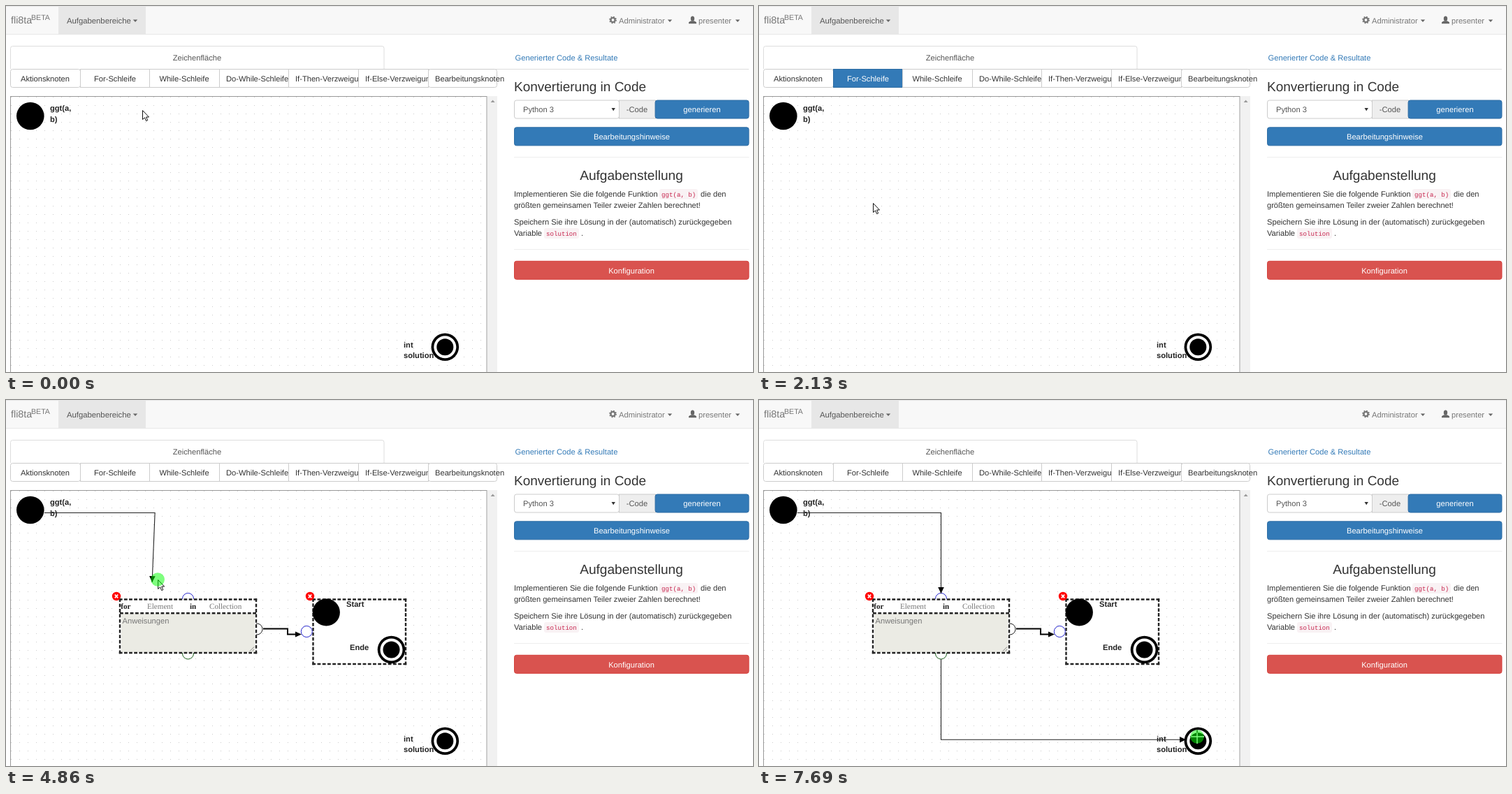
These frames come from a looping animation (1069 by 524 pixels, 8 s). An HTML page:

```html
<!DOCTYPE html>
<html lang="de">
<head>
<meta charset="utf-8">
<title>Aktivitätsdiagramm</title>
<style>
html, body { margin: 0; width: 100%; height: 100%; overflow: hidden; background: #fff; }
svg { display: block; isolation: isolate; }
text { font: 11.15px "Liberation Sans", Arial, sans-serif; fill: #333; text-rendering: geometricPrecision; white-space: pre; }
.mid { text-anchor: middle; }
.bold { font-weight: bold; fill: #222; }
.head { font-size: 19.1px; }
.nav { fill: #777; }
.white { fill: #fff; }
.link { fill: #337ab7; }
.code { font: 9.15px "Liberation Mono", monospace; fill: #c7254e; }
.serif { font: 11.1px "Liberation Serif", Times, serif; fill: #777; }
.serif.bold { font-weight: bold; fill: #222; }
.wire { fill: none; stroke: #222; stroke-width: 1.1; }
</style>
</head>
<body>
<svg id="stage" width="1069" height="524" viewBox="0 0 1069 524"></svg>
<script>
const LOOP = 8000;
const stage = document.getElementById('stage');

// Markup helpers
const text = (x, y, s, cls = '', extra = '') => `<text x="${x}" y="${y}" class="${cls}" ${extra}>${s}</text>`;
const box = (x, y, r, b, fill, stroke = 'none', rx = 0) => {
  const o = stroke === 'none' ? 0 : 0.5;
  return `<rect x="${x + o}" y="${y + o}" width="${r - x - 2 * o}" height="${b - y - 2 * o}" rx="${rx}" fill="${fill}" stroke="${stroke}"/>`;
};
const disc = (x, y, r, fill, stroke = 'none', w = 1) =>
  `<circle cx="${x}" cy="${y}" r="${r}" fill="${fill}" stroke="${stroke}" stroke-width="${w}"/>`;
const path = (d, fill = 'none', stroke = 'none', w = 1) => `<path d="${d}" fill="${fill}" stroke="${stroke}" stroke-width="${w}"/>`;
const caret = (x, y) => path(`M${x - 3.2} ${y}h6.4l-3.2 3.4z`, '#666');
const finalNode = (x, y) => disc(x, y, 19.8, '#000') + disc(x, y, 16, '#fff') + disc(x, y, 12, '#000');
const closer = (x, y) => disc(x, y, 6.2, '#f00') + path(`M${x - 2.2} ${y - 2.3}l4.4 4.6m0-4.6l-4.4 4.6`, 'none', '#fff', 1.7);
const group = (id, content, extra = '') => `<g id="${id}" ${extra}>${content}</g>`;

// A dashed side begins and ends with a full dash; the gaps stretch to fit.
function dashed(x1, y1, x2, y2) {
  const dash = 4.8, length = Math.hypot(x2 - x1, y2 - y1);
  const gaps = Math.round((length - dash) / (dash * 1.5));
  const gap = (length - dash) / gaps - dash;
  return `<path d="M${x1} ${y1}L${x2} ${y2}" stroke="#222" stroke-width="2.4" stroke-dasharray="${dash} ${gap}"/>`;
}

function dashedBox(x, y, r, b) {
  const o = 1.2;
  return dashed(x, y + o, r, y + o) + dashed(x, b - o, r, b - o)
    + dashed(x + o, y, x + o, b) + dashed(r - o, y, r - o, b);
}

function navBar() {
  return box(0, 0, 1069, 40, '#f8f8f8') + path('M0 .5H1069M0 40.5H1069', 'none', '#e7e7e7')
    + box(75, 0, 200, 40, '#e7e7e7')
    + text(7, 25, 'fli8ta', 'nav', 'style="font-size:14.3px"')
    + text(36, 20, 'BETA', 'nav', 'style="font-size:10.6px"')
    + text(87, 24.5, 'Aufgabenbereiche', '', 'style="fill:#555;font-size:11.3px"') + caret(185, 19.5)
    + disc(868.5, 20, 3.1, 'none', '#777', 2.4)
    + '<circle cx="868.5" cy="20" r="4.6" fill="none" stroke="#777" stroke-width="1.6" stroke-dasharray="1.8 1.81"/>'
    + text(877, 24.5, 'Administrator', 'nav') + caret(950, 19.5)
    + '<ellipse cx="982.5" cy="18" rx="2.7" ry="3.5" fill="#666"/>'
    + path('M977 25.2v-1.8q.3-1 3.5-2.2h4q3.2 1.2 3.5 2.2v1.8z', '#666')
    + text(991, 24.5, 'presenter', 'nav') + caret(1047, 19.5);
}

const toolLabels = ['Aktionsknoten', 'For-Schleife', 'While-Schleife', 'Do-While-Schleife',
  'If-Then-Verzweigung', 'If-Else-Verzweigung', 'Bearbeitungsknoten'];

function toolBar() {
  return toolLabels.map((label, i) => {
    const x = Math.round(6 + i * 99.6), r = Math.round(6 + (i + 1) * 99.6) + (i < 6 ? 1 : 0);
    const id = i === 1 ? 'id="forButton"' : '';
    return `<g ${id}>` + box(x, 90, r, 117, '#fff', '#ccc', i % 6 ? 0 : 3)
      + (i < 3 ? text(x + 50, 107.5, label, 'mid') : text(x + 10, 107.5, label)) + '</g>';
  }).join('');
}

function sidePanel() {
  return text(802, 77.5, 'Generierter Code &amp; Resultate', 'mid link')
    + text(727, 122.4, 'Konvertierung in Code', 'head', 'style="font-size:19px"')
    + box(727, 134.5, 878, 161.5, '#fff', '#ccc', 3) + text(740, 152, 'Python 3', '', 'style="fill:#555"')
    + path('M866.5 146h5.4l-2.7 4.2z', '#333')
    + box(877, 134.5, 930, 161.5, '#eee', '#ccc') + text(903, 152, '-Code', 'mid', 'style="fill:#555"')
    + box(928.6, 134.5, 1063.5, 161.5, '#337ab7', '#2e6da4', 3) + text(996, 152, 'generieren', 'mid white')
    + box(727, 173.3, 1063.5, 200.3, '#337ab7', '#2e6da4', 3) + text(895.5, 190.5, 'Bearbeitungshinweise', 'mid white')
    + path('M727 216.5H1063.5M727 348.5H1063.5', 'none', '#eee')
    + text(895, 249, 'Aufgabenstellung', 'mid head')
    + text(727, 273, 'Implementieren Sie die folgende Funktion')
    + box(935, 262, 990, 277, '#f9f2f4', 'none', 3) + text(938, 273, 'ggt(a, b)', 'code')
    + text(994, 273, 'die den')
    + text(727, 289, 'größten gemeinsamen Teiler zweier Zahlen berechnet!', '', 'style="font-size:11.05px"')
    + text(727, 313, 'Speichern Sie ihre Lösung in der (automatisch) zurückgegeben')
    + text(727, 329, 'Variable') + box(770, 318, 820, 333, '#f9f2f4', 'none', 3)
    + text(773, 329, 'solution', 'code') + text(823, 329, '.')
    + box(727, 364.8, 1063.5, 391.8, '#d9534f', '#d43f3a', 3) + text(895, 382.5, 'Konfiguration', 'mid white');
}

function drawingArea() {
  return '<defs><pattern id="dots" x="7" y="130" width="12" height="12" patternUnits="userSpaceOnUse">'
    + '<rect width="1" height="1" fill="#ccc"/></pattern></defs>'
    + box(6, 129, 688.5, 540, 'url(#dots)', '#999')
    + box(689, 129, 703, 524, '#f1f1f1') + path('M693.6 138h6l-3-3.4z', '#999')
    + disc(34.8, 157.5, 19.8, '#000')
    + text(63, 150, 'ggt(a,', 'bold') + text(63, 165.5, 'b)', 'bold')
    + finalNode(628.3, 488.2)
    + text(569, 488.5, 'int', 'bold') + text(569, 504, 'solution', 'bold');
}

function loopNodes() {
  return disc(260.5, 284.5, 8, '#fff', '#22c') + disc(359, 328, 8, '#fff', '#222') + disc(260.5, 363, 8, '#fff', '#185c18')
    + box(162, 285, 358, 362, '#fff') + box(165, 306, 356, 361, '#ebebe4')
    + dashedBox(161.8, 284.3, 359.2, 363.2) + dashed(163, 305.2, 358, 305.2)
    + text(164.3, 298.5, 'for', 'serif bold') + text(202, 298.5, 'Element', 'serif')
    + text(263, 298.5, 'in', 'serif bold') + text(291, 298.5, 'Collection', 'serif')
    + text(166.5, 320, 'Anweisungen', 'nav')
    + path('M349 359.5l6-6m-2.5 6l2.5-2.5', 'none', '#777', 0.9) + closer(158, 281)
    + box(439, 285, 572, 378, '#fff') + dashedBox(438.3, 284.3, 573.2, 379.2)
    + disc(458.3, 304, 19.6, '#000') + text(487, 296.2, 'Start', 'bold')
    + finalNode(551.5, 357.5) + text(492, 357.5, 'Ende', 'bold')
    + disc(430.3, 331.5, 8, '#fff', '#22c') + closer(435, 281)
    + path('M368 327.5H403V335.5H415', 'none', '#000', 2) + path('M414 331.5v8l9-4z', '#000');
}

const wire = id => group(id, '<path class="wire"/><path d="M-4.3-9h8.6L0 0z"/>');

const pointers = {
  arrow: path('M.5.5V13.5L3.5 10.8 5.6 15.6 7.7 14.7 5.6 10H9.5Z', '#fff', '#111'),
  hand: path('M-1.5 9V1.3Q0-.8 1.5 1.3V6Q3 4.6 4.2 6.3 5.8 5.2 6.8 7 8.8 6.4 9 8.5V11Q8.8 13 7.8 15.5H.5Q-1 13-4.2 9.6-4.8 7.4-2.8 7.8Z', '#fff', '#111')
    + path('M1.5 6V9M4.2 6.5V9M6.8 7.2V9', 'none', '#111', 0.8),
  beam: path('M-3-6.5H-1L0-5.5 1-6.5H3M0-5.5V5.5M-3 6.5H-1L0 5.5 1 6.5H3', 'none', '#222'),
  cross: path('M-10 0H10M0-10V10', 'none', '#fff', 1.4)
};

stage.innerHTML = navBar()
  + path('M6.5 90V60.5q0-3 3-3H538q3 0 3 3V90.5H1063', 'none', '#ddd')
  + text(273.5, 77.5, 'Zeichenfläche', 'mid', 'style="fill:#555"')
  + toolBar() + drawingArea() + group('nodes', loopNodes()) + wire('inWire') + wire('outWire') + sidePanel()
  + Object.entries(pointers).map(([id, shape]) =>
    group(id, shape, id === 'cross' ? 'style="mix-blend-mode:difference"' : '')).join('')
  + '<circle id="press" r="9.8" fill="#0f0" opacity=".5"/>';

const el = id => document.getElementById(id);
const show = (id, on) => el(id).setAttribute('display', on ? 'inline' : 'none');

const smooth = p => p * p * (3 - 2 * p);
const easeIn = p => p ** 1.5;
const easeOut = p => 1 - (1 - p) ** 1.6;

// Pointer stops: time, x, y, easing on the way there
const stops = [
  [0, 195, 149], [420, 195, 149], [760, 188, 112], [980, 188, 112], [1220, 180, 142, easeIn],
  [1980, 164, 282, easeOut], [2130, 163, 282], [2620, 163, 282], [3110, 60, 201], [3260, 60, 200],
  [3910, 28, 154], [4080, 28, 154], [4860, 217, 257, easeIn], [5440, 261, 272, easeOut],
  [5640, 261, 272], [6000, 265, 322], [6430, 260, 367], [6660, 260, 367], [7430, 627, 482], [LOOP, 627, 482]
];

function pointerAt(t) {
  const i = stops.findIndex(s => s[0] > t);
  const [t0, x0, y0] = stops[i - 1], [t1, x1, y1, ease = smooth] = stops[i];
  const p = ease((t - t0) / (t1 - t0));
  return [x0 + (x1 - x0) * p, y0 + (y1 - y0) * p];
}

const near = (x, y, cx, cy, r) => Math.hypot(x - cx, y - cy) < r;
const within = (v, a, b) => v >= a && v < b;

function pointerKind(x, y, hasNodes) {
  if (within(x, 106, 206) && within(y, 90, 117)) return 'hand';
  if (near(x, y, 35, 157.5, 20) || near(x, y, 628, 488.5, 20)) return 'cross';
  if (hasNodes && y > 362 && near(x, y, 260, 363, 9)) return 'cross';
  if (hasNodes && within(x, 165, 356) && within(y, 306, 361)) return 'beam';
  return 'arrow';
}

function setWire(id, points, angle) {
  const [line, head] = el(id).children;
  const [x, y] = points[points.length - 1];
  line.setAttribute('d', 'M' + points.join('L'));
  head.setAttribute('transform', `translate(${x} ${y}) rotate(${angle})`);
}

function setForButton(state) {
  const [rect, label] = el('forButton').children;
  const [fill, stroke, ink] = {
    plain: ['#fff', '#ccc', '#333'], hover: ['#e6e6e6', '#adadad', '#333'], active: ['#337ab7', '#2e6da4', '#fff']
  }[state];
  rect.setAttribute('fill', fill);
  rect.setAttribute('stroke', stroke);
  label.style.fill = ink;
}

function render(t) {
  const [x, y] = pointerAt(t);
  const hasNodes = t >= 2620;
  const kind = pointerKind(x, y, hasNodes);
  const at = `translate(${x} ${y})`;
  for (const id in pointers) {
    show(id, id === kind);
    el(id).setAttribute('transform', at);
  }
  el('press').setAttribute('transform', at);
  show('press', within(t, 2400, 2450) || within(t, 4100, 5650) || within(t, 6690, 7430) || t >= 7690);

  setForButton(within(t, 960, 2620) ? 'active' : kind === 'hand' ? 'hover' : 'plain');
  show('nodes', hasNodes);

  show('inWire', t >= 4100);
  if (t < 5440) setWire('inWire', [[55, 161.5], [x - 4, 161.5], [x - 8, y + 4]], y + 4 < 161.5 ? 180 : 2);
  else setWire('inWire', [[55, 161.5], [260.5, 161.5], [260.5, 277]], 0);

  show('outWire', t >= 6690);
  const docked = near(x, y, 628, 488.5, 20);
  const [endX, endY] = docked ? [611, 486.2] : [x - 8, y + 4];
  setWire('outWire', [[260.5, 371], [260.5, endY], [endX, endY]], -90);
}

function tick(now) {
  render(now % LOOP);
  requestAnimationFrame(tick);
}
render(0);
requestAnimationFrame(tick);
</script>
</body>
</html>
```
